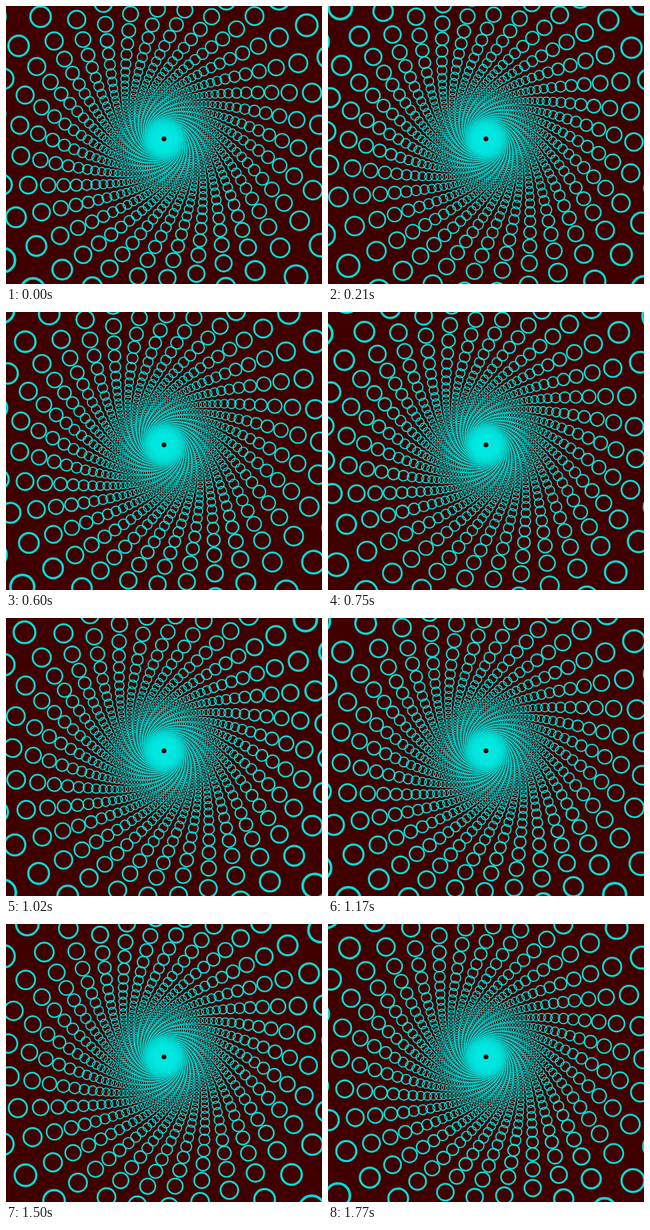
An HTML page with a canvas for the animation above (1800 ms loop, 540 px wide and 475 px high).

```html
<!DOCTYPE html>
<html lang="en">
<head>
<meta charset="utf-8">
<title>Spiral tunnel</title>
<style>
  html, body { margin: 0; width: 540px; height: 475px; overflow: hidden; background: #400000; }
  canvas { display: block; }
</style>
</head>
<body>
<canvas id="stage" width="540" height="475"></canvas>
<script>
const ctx = document.getElementById('stage').getContext('2d');
const RAD = Math.PI / 180;
const FRAMES = 60, FRAME_MS = 30;
const STEP = 12.1;              // degrees between neighbouring circles of the helix
const FIRST = 120, LAST = 9600;
const PER_TURN = 30;
const FOCAL = 49340;            // distance from centre = FOCAL / depth

function draw(frame) {
  ctx.fillStyle = '#400000';
  ctx.fillRect(0, 0, 540, 475);
  ctx.strokeStyle = 'rgba(0,232,225,.95)';
  // Three full turns per loop, plus one step along the helix.
  const turn = 73.3 + (18 + STEP / FRAMES) * frame;
  const shift = 0.3 - frame / FRAMES;

  // Circles within one turn do not overlap, so they share a stroke.
  for (let start = LAST; start > FIRST; start -= PER_TURN) {
    ctx.beginPath();
    for (let i = start; i > start - PER_TURN; i--) {
      const dist = FOCAL / (i + shift);
      const angle = (turn - STEP * i) * RAD;
      const x = 270 + dist * Math.cos(angle);
      const y = 227 + dist * Math.sin(angle);
      const r = dist * 0.0593;
      ctx.moveTo(x + r, y);
      ctx.arc(x, y, r, 0, 2 * Math.PI);
    }
    ctx.lineWidth = 0.4 + 0.0112 * FOCAL / (start - PER_TURN / 2);
    ctx.stroke();
  }
}

const begin = performance.now();
let shown = -1;

function tick() {
  const frame = Math.floor((performance.now() - begin) / FRAME_MS) % FRAMES;
  if (frame !== shown) draw(shown = frame);
  requestAnimationFrame(tick);
}
tick();
</script>
</body>
</html>
```
